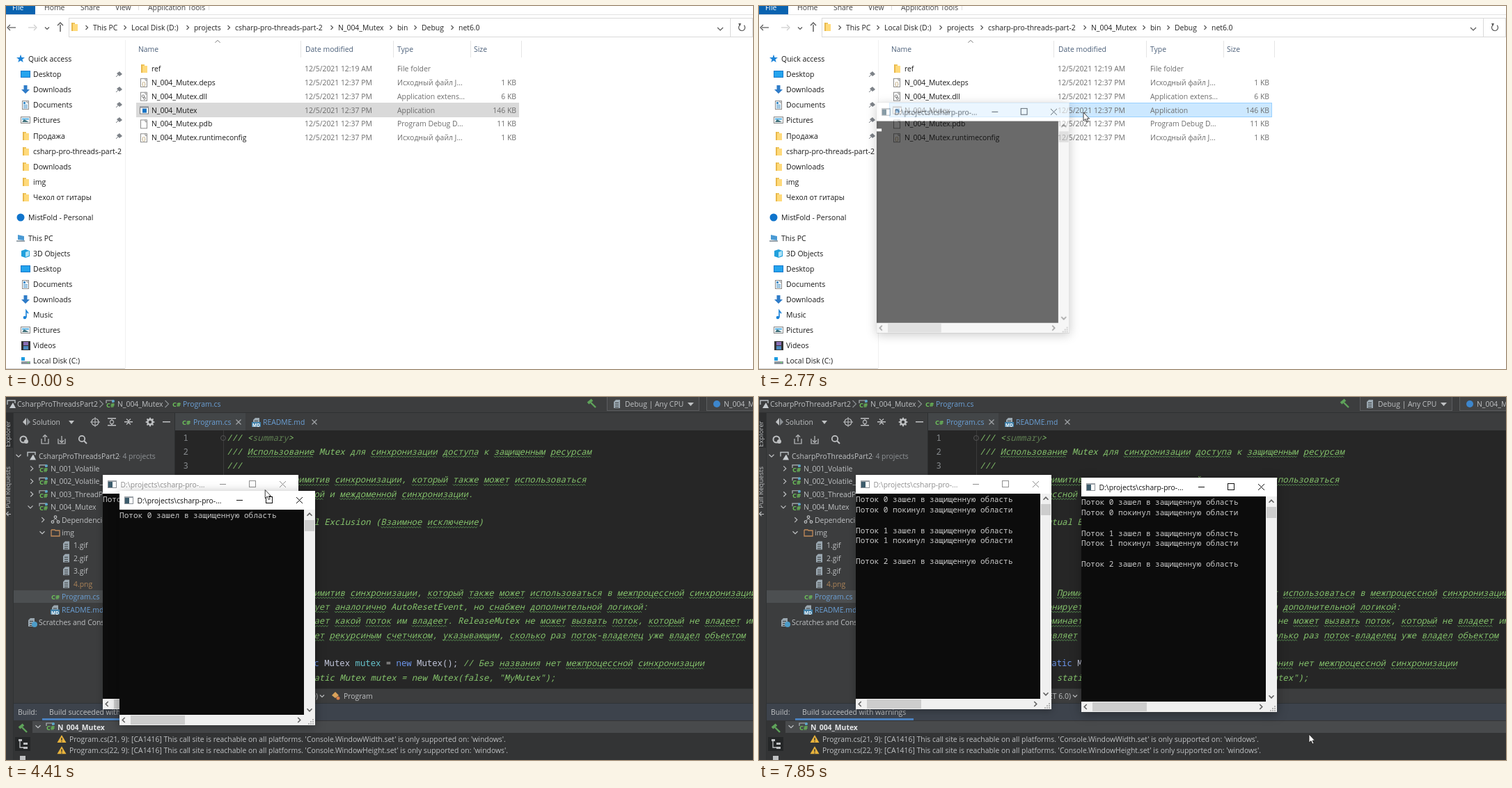
These frames come from a looping animation (1073 by 522 pixels, 8000 ms). An HTML page with a canvas:

```html
<!DOCTYPE html>
<html lang="ru">
<head>
<meta charset="utf-8">
<title>Mutex demo</title>
<style>
html, body { margin: 0; width: 100%; height: 100%; overflow: hidden; background: #fff; }
canvas { display: block; width: 1073px; height: 522px; }
</style>
</head>
<body>
<canvas id="stage" width="1073" height="522"></canvas>
<script>
const W = 1073, H = 522, LOOP = 8000;
const UI = '10.4px "Open Sans", "Noto Sans", sans-serif';
const CODE = 'italic 12.3px "Noto Sans Mono", monospace';
const TERM = '11.05px "Noto Sans Mono", monospace';
const stage = document.getElementById('stage').getContext('2d');
let g = stage;

// Drawing helpers; text is placed by its visual middle.
function rect(x, y, w, h, color) { g.fillStyle = color; g.fillRect(x, y, w, h); }
function text(s, x, y, color = '#1a1a1a', font = UI, align = 'left') {
  g.font = font; g.fillStyle = color; g.textAlign = align;
  g.fillText(s, x, y + 4);
}
function line(color, width, ...p) {
  g.strokeStyle = color; g.lineWidth = width;
  g.beginPath();
  for (let i = 0; i < p.length; i += 2) g.lineTo(p[i], p[i + 1]);
  g.stroke();
}
function box(x, y, w, h, color) { g.strokeStyle = color; g.lineWidth = 1; g.strokeRect(x + .5, y + .5, w - 1, h - 1); }
function dot(x, y, r, color) { g.fillStyle = color; g.beginPath(); g.arc(x, y, r, 0, 7); g.fill(); }
function ring(x, y, r, color, width = 1.2, from = 0, to = 7) {
  g.strokeStyle = color; g.lineWidth = width; g.beginPath(); g.arc(x, y, r, from, to); g.stroke();
}
function poly(color, ...p) {
  g.fillStyle = color; g.beginPath();
  for (let i = 0; i < p.length; i += 2) g.lineTo(p[i], p[i + 1]);
  g.fill();
}
function chevron(x, y, dir, r, color, width = 1.2) {
  g.save(); g.translate(x, y); g.rotate(dir * Math.PI / 2);
  line(color, width, -r / 2, -r, r / 2, 0, -r / 2, r);
  g.restore();
}
const RIGHT = 0, DOWN = 1, LEFT = 2, UP = 3;
function layer(w, h, draw) {
  const c = document.createElement('canvas');
  c.width = w; c.height = h;
  const before = g;
  g = c.getContext('2d');
  draw();
  g = before;
  return c;
}

// ---------- File explorer ----------
const icons = {
  folder(x, y) { rect(x - 4, y - 6, 5, 11, '#f0c75e'); rect(x - 4, y - 4, 9, 10, '#ffda7b'); rect(x - 4, y - 6, 2, 12, '#e8b84c'); },
  page(x, y) { rect(x - 5, y - 6, 10, 13, '#fff'); box(x - 5, y - 6, 10, 13, '#8b8b8b'); line('#8b8b8b', 1, x + 2, y - 6, x + 2, y - 3, x + 5, y - 3); },
  json(x, y) { icons.page(x, y); text('{}', x, y, '#9a7b3a', '7px "Open Sans", sans-serif', 'center'); },
  dll(x, y) { icons.page(x, y); ring(x - 1, y, 1.8, '#777', 1); ring(x + 1, y + 3, 1.5, '#777', 1); },
  app(x, y) { rect(x - 6, y - 5, 13, 11, '#fff'); box(x - 6, y - 5, 13, 11, '#777'); rect(x - 6, y - 5, 13, 2, '#8a9099'); rect(x - 2, y - 2, 6, 6, '#1673c4'); },
  star(x, y) {
    const p = [];
    for (let i = 0; i < 10; i++) { const r = i % 2 ? 2.6 : 6.3, a = i * Math.PI / 5 - 1.57; p.push(x + r * Math.cos(a), y + r * Math.sin(a)); }
    poly('#1b83d8', ...p);
  },
  desktop(x, y) { rect(x - 7, y - 5, 14, 10, '#1278cc'); rect(x - 6, y - 4, 12, 8, '#24a4ee'); },
  down(x, y) { poly('#2f7cc8', x - 2.5, y - 6, x + 2.5, y - 6, x + 2.5, y, x + 6, y, x, y + 6, x - 6, y, x - 2.5, y); },
  doc(x, y) { icons.page(x, y); rect(x - 3, y - 4, 3, 3, '#3a8cc8'); for (let i = 0; i < 3; i++) rect(x - 3, y + i * 2, 6, 1, '#4a94c8'); },
  pic(x, y) { rect(x - 7, y - 5, 14, 10, '#fff'); box(x - 7, y - 5, 14, 10, '#888'); rect(x - 5, y - 3, 10, 3, '#7ec3ea'); poly('#3f6f78', x - 5, y + 3, x - 2, y - 1, x + 5, y + 3); },
  cloud(x, y) { dot(x, y, 5.5, '#0f74cc'); },
  pc(x, y) { poly('#4a9ad4', x - 4, y - 5, x + 5, y - 3, x + 5, y + 3, x - 4, y + 2); rect(x - 6, y + 3, 12, 2, '#9aa4ac'); },
  cube(x, y) { poly('#20a0dc', x, y - 6, x + 6, y - 4, x + 6, y + 4, x, y + 6, x - 6, y + 4, x - 6, y - 4); poly('#aee3f7', x, y - 2, x + 5, y - 4, x + 5, y + 3, x, y + 5); },
  music(x, y) { dot(x - 1, y + 4, 2.3, '#1b83d8'); line('#1b83d8', 1.6, x + 1, y + 4, x + 1, y - 6, x + 4, y - 2); },
  video(x, y) { rect(x - 6, y - 6, 13, 13, '#333'); rect(x - 3, y - 5, 7, 5, '#8a6fb5'); rect(x - 3, y + 1, 7, 5, '#4d8ac0'); },
  disk(x, y) { rect(x - 6, y + 1, 13, 4, '#8c959c'); rect(x - 6, y - 5, 5, 5, '#1b9be0'); rect(x + 3, y + 2, 2, 1, '#5f5'); }
};
const sidebar = [
  ['star', 'Quick access', 76, 0], ['desktop', 'Desktop', 98, 2], ['down', 'Downloads', 120, 2], ['doc', 'Documents', 142, 2],
  ['pic', 'Pictures', 164, 2], ['folder', 'Продажа', 187, 2], ['folder', 'csharp-pro-threads-part-2', 209, 1],
  ['folder', 'Downloads', 231, 1], ['folder', 'img', 253, 1], ['folder', 'Чехол от гитары', 275, 1],
  ['cloud', 'MistFold - Personal', 304, 0], ['pc', 'This PC', 334, 0], ['cube', '3D Objects', 356, 1],
  ['desktop', 'Desktop', 378, 1], ['doc', 'Documents', 400, 1], ['down', 'Downloads', 422, 1], ['music', 'Music', 444, 1],
  ['pic', 'Pictures', 466, 1], ['video', 'Videos', 488, 1], ['disk', 'Local Disk (C:)', 510, 1]
];
const files = [
  ['folder', 'ref', 'File folder', ''], ['json', 'N_004_Mutex.deps', 'Исходный файл J...', '1 KB'],
  ['dll', 'N_004_Mutex.dll', 'Application extens...', '6 KB'], ['app', 'N_004_Mutex', 'Application', '146 KB'],
  ['page', 'N_004_Mutex.pdb', 'Program Debug D...', '11 KB'], ['json', 'N_004_Mutex.runtimeconfig', 'Исходный файл J...', '1 KB']
];

function drawExplorer(hot) {
  g.translate(8, 29);
  rect(-8, -29, 1300, 760, '#fff');
  rect(191, -29, 100, 18, '#ecdcf7');
  text('Manage', 241, -19, '#555', UI, 'center');
  text('net6.0', 316, -19, '#333', UI, 'center');
  icons.folder(0, -19);
  rect(-8, -11, 50, 23, '#0a63b0');
  text('File', 9, 2, '#fff');
  [['Home', 55], ['Share', 107], ['View', 157], ['Application Tools', 204]].forEach(([s, x]) => text(s, x, 2, '#444'));
  rect(190, -11, 1, 17, '#ddd'); rect(291, -11, 1, 17, '#ddd');
  rect(-8, 12, 1300, 1, '#e2e2e2');

  const ink = '#555';
  line(ink, 1.2, 14, 31, 4, 31); chevron(4, 31, LEFT, 4, ink);
  line('#ccc', 1.2, 32, 31, 42, 31); chevron(42, 31, RIGHT, 4, '#ccc');
  chevron(59, 32, DOWN, 3, ink);
  line(ink, 1.4, 78, 37, 78, 27); chevron(78, 26, UP, 4, ink, 1.4);
  box(90, 17, 951, 28, '#d9d9d9'); box(1040, 17, 33, 28, '#d9d9d9'); box(1082, 17, 190, 28, '#d9d9d9');
  text('Search net6.0', 1118, 31, '#777');
  ring(1102, 30, 4, '#777');
  icons.folder(98, 30);
  [['This PC', 125], ['Local Disk (D:)', 180], ['projects', 270], ['csharp-pro-threads-part-2', 329],
   ['N_004_Mutex', 477], ['bin', 562], ['Debug', 597], ['net6.0', 650]].forEach(([s, x]) => {
    chevron(x - 9, 31, RIGHT, 3, ink); text(s, x, 31, '#222');
  });
  chevron(1026, 33, DOWN, 4, ink);
  ring(1057, 31, 4.5, ink, 1.2, -.8, 4.2); poly(ink, 1052, 25, 1056, 25, 1054, 29);

  sidebar.forEach(([icon, name, y, level]) => {
    icons[icon](level ? 28 : 21, y);
    text(name, level ? 39 : 32, y, '#1a1a1a', UI.replace('10.4', '10.5'));
    if (level === 2) { line('#7d8288', 1, 158, y + 4, 161, y + 1); poly('#7d8288', 159, y - 1, 163, y - 4, 167, y, 163, y + 3); }
  });
  rect(171, 49, 1, 472, '#f1f1f1'); rect(0, 521, 171, 1, '#d0d0d0');

  [['Name', 190, 423], ['Date modified', 430, 556], ['Type', 562, 667], ['Size', 672, 740]].forEach(([s, x, edge]) => {
    text(s, x, 62, '#4c607a'); rect(edge, 50, 1, 24, '#e5e5e5');
  });
  chevron(304, 51, UP, 3.5, '#777', 1);
  files.forEach(([icon, name, type, size], i) => {
    const y = 90 + i * 19.85;
    if (i === 3) {
      rect(187, 139, 550, 21, hot ? '#cce8ff' : '#d9d9d9');
      if (hot) box(187, 139, 550, 21, '#99d1ff');
    }
    icons[icon](198, y);
    text(name, 209, y);
    text(i ? '12/5/2021 12:37 PM' : '12/5/2021 12:19 AM', 429, y, '#6d6d6d');
    text(type, 562, y, '#6d6d6d');
    text(size, 733, y, '#6d6d6d', UI, 'right');
  });
}

// ---------- IDE ----------
const CH = 7.38, LEFT_COL = 317, GREEN = '#85c46c';
function codeLine(s, row, color = GREEN, col = 0) {
  const y = 58.5 + (row - 1) * 20.3, x = LEFT_COL + col * CH;
  text(s, x, y, color, CODE);
  for (const m of s.matchAll(/[а-яё]{4,}/gi)) {
    const wave = [];
    for (let i = 0; i <= m[0].length * CH; i += 2) wave.push(x + m.index * CH + i, y + 7 + (i % 4 ? 1 : -1));
    line('#5d9a56', .9, ...wave);
  }
}
function csharp(x, y, color = '#6cbf5a') { text('C#', x, y, color, 'bold 9.5px "Open Sans", sans-serif'); }
function projectIcon(x, y) {
  line('#b0b6ba', 1.2, x + 1, y - 1, x + 1, y - 5, x + 10, y - 5, x + 10, y - 2);
  dot(x + 11, y - 4, 2, '#5aa7c8'); csharp(x + 1, y + 1);
}
function solutionIcon(x, y) {
  line('#b9bfc3', 1.4, x, y + 1, x, y - 5, x + 11, y - 5, x + 11, y - 1);
  poly('#c7ccd0', x + 3, y + 6, x + 8, y - 2, x + 12, y + 6);
}
function fileIcon(x, y, color = '#9aa7b0') {
  poly(color, x + 3, y - 6, x + 9, y - 6, x + 9, y + 6, x, y + 6, x, y - 3);
  for (let i = 0; i < 3; i++) rect(x + 2, y - 2 + i * 3, 5, 1, '#3c3f41');
}
function markdownIcon(x, y) {
  fileIcon(x + 2, y); rect(x, y, 13, 7, '#3f7fa8');
  text('MD', x + 1, y + 3, '#fff', 'bold 6.5px "Open Sans", sans-serif');
}
function hammer(x, y) { line('#5fa35a', 2.4, x + 6, y + 6, x - 1, y - 1); line('#5fa35a', 4, x - 5, y, x + 1, y - 5); }
function warning(x, y) { poly('#e8b33c', x, y - 6, x + 6.5, y + 5, x - 6.5, y + 5); rect(x - .7, y - 2, 1.4, 4, '#333'); rect(x - .7, y + 3, 1.4, 1.2, '#333'); }

function drawIde() {
  const panel = '#3c3d3e', light = '#bfc1c3', blue = '#6ba0d6';
  rect(0, 0, W, H, panel);
  rect(0, 22, W, 1, '#2f3132');
  solutionIcon(2, 10);
  text('CsharpProThreadsPart2', 16, 10, light);
  chevron(137, 10, RIGHT, 5, '#8b8f92'); projectIcon(143, 10);
  text('N_004_Mutex', 160, 10, light);
  chevron(231, 10, RIGHT, 5, '#8b8f92'); csharp(239, 10);
  text('Program.cs', 254, 10, blue);
  hammer(841, 9);
  rect(863, 0, 133, 20, '#434445'); box(863, -1, 133, 21, '#5b5d5f');
  fileIcon(873, 10); text('Debug | Any CPU', 889, 10, light);
  poly(light, 979, 8, 988, 8, 983.5, 13);
  rect(1006, 0, 67, 20, '#434445'); box(1006, -1, 80, 21, '#5b5d5f');
  dot(1021, 10, 5, '#3d86cc'); text('N_004_Mutex', 1031, 10, light);

  rect(0, 23, 10, H, '#393a3b'); rect(0, 23, 10, 50, '#2d2e2f'); rect(10, 23, 1, H, '#303233');
  [['Explorer', 72], ['Pull Requests', 160]].forEach(([s, y]) => {
    g.save(); g.translate(2, y); g.rotate(-Math.PI / 2); text(s, 0, 0, light, UI.replace('10.4', '9.6')); g.restore();
  });
  rect(2, 168, 5, 1, light); chevron(2, 168, LEFT, 3, light);

  poly(light, 24, 36, 29, 30, 29, 41); poly('#8b9094', 30, 30, 35, 36, 30, 41);
  text('Solution', 38, 36, light); poly(light, 90, 34, 98, 34, 94, 39);
  ring(128, 36, 5, light); line(light, 1, 121, 36, 135, 36); line(light, 1, 128, 29, 128, 43);
  // Expand all, then collapse all.
  [152, 176].forEach((x, i) => {
    if (i) rect(x - 6, 35, 12, 1.5, light);
    else { rect(x - 6, 30, 12, 1.5, light); rect(x - 6, 40, 12, 1.5, light); }
    chevron(x, i ? 33 : 34, i ? DOWN : UP, 3, light); chevron(x, 38, i ? UP : DOWN, 3, light);
  });
  ring(207, 36, 3.6, light, 2.6);
  for (let i = 0; i < 8; i++) dot(207 + 5.4 * Math.cos(i * .785), 36 + 5.4 * Math.sin(i * .785), 1.1, light);
  rect(225, 35, 11, 1.5, light);
  ring(25, 61, 4.5, light, 2); dot(29, 64, 3, light);
  [56, 80].forEach((x, i) => {
    line(light, 1.2, x - 5, 60, x - 5, 67, x + 5, 67, x + 5, 60);
    line(light, 1.2, x, 64, x, 56); chevron(x, i ? 64 : 56, i ? DOWN : UP, 3, light);
  });
  ring(109, 60, 4.2, light, 1.8); line(light, 2, 112, 63, 116, 67);

  rect(11, 278, 232, 18, '#4c4f51');
  const rowY = i => 84.5 + i * 18.42;
  chevron(18, rowY(0), DOWN, 3.5, light); solutionIcon(31, rowY(0));
  text('CsharpProThreadsPart2', 47, rowY(0), light); text('· 4 projects', 162, rowY(0), '#8d9194');
  ['N_001_Volatile', 'N_002_Volatile_Fix', 'N_003_ThreadPool', 'N_004_Mutex'].forEach((s, i) => {
    chevron(i < 3 ? 37 : 35, rowY(i + 1), i < 3 ? RIGHT : DOWN, 3.5, light);
    projectIcon(47, rowY(i + 1)); text(s, 64, rowY(i + 1), light);
  });
  chevron(53, rowY(5), RIGHT, 3.5, light);
  [[71, -4], [67, 3], [75, 3]].forEach(([x, dy]) => ring(x, rowY(5) + dy, 1.8, light));
  line(light, 1, 68, rowY(5) + 1, 71, rowY(5) - 2, 74, rowY(5) + 1); text('Dependencies', 80, rowY(5), light);
  chevron(52, rowY(6), DOWN, 3.5, light);
  line('#c08a5a', 1.3, 65, rowY(6) - 4, 70, rowY(6) - 4, 71, rowY(6) - 3, 77, rowY(6) - 3, 77, rowY(6) + 5, 65, rowY(6) + 5, 65, rowY(6) - 4);
  text('img', 80, rowY(6), light);
  ['1.gif', '2.gif', '3.gif', '4.png'].forEach((s, i) => { fileIcon(82, rowY(i + 7)); text(s, 97, rowY(i + 7), i < 3 ? light : '#ad8458'); });
  csharp(65, rowY(11)); text('Program.cs', 80, rowY(11), blue);
  markdownIcon(64, rowY(12)); text('README.md', 80, rowY(12), blue);
  fileIcon(32, rowY(13)); dot(41, rowY(13) + 3, 4, '#4d9cc8'); text('Scratches and Consoles', 47, rowY(13), light);

  rect(242, 23, 1, 418, '#2d2f30');
  rect(243, 23, 101, 25, '#434648');
  csharp(253, 36); text('Program.cs', 269, 36, blue);
  markdownIcon(353, 36); text('README.md', 369, 36, blue);
  [334, 443].forEach(x => { line('#a0a4a7', 1.2, x - 3.5, 32.5, x + 3.5, 39.5); line('#a0a4a7', 1.2, x + 3.5, 32.5, x - 3.5, 39.5); });
  rect(243, 48, W, 372, '#262626'); rect(312, 48, 1, 372, '#3a3a3a');
  for (let n = 1; n <= 18; n++) text(String(n), n < 10 ? 262 : 269, 58.5 + (n - 1) * 20.3, '#85898c', CODE.replace('italic ', ''), 'right');
  ring(312, 59, 3.5, '#555', 1);
  codeLine('/// <', 1); codeLine('summary', 1, '#5f7f52', 5); codeLine('>', 1, GREEN, 12);
  codeLine('/// Использование Mutex для синхронизации доступа к защищенным ресурсам', 2);
  codeLine('///', 3);
  codeLine('/// Mutex - Примитив синхронизации, который также может использоваться', 4);
  codeLine('/// в межпроцессной и междоменной синхронизации.', 5);
  codeLine('/// Mutex - Mutual Exclusion (Взаимное исключение)', 7);
  codeLine('Примитив синхронизации, который также может использоваться в межпроцессной синхронизации', 12, GREEN, 15);
  codeLine('функционирует аналогично AutoResetEvent, но снабжен дополнительной логикой:', 13, GREEN, 7);
  codeLine('запоминает какой поток им владеет. ReleaseMutex не может вызвать поток, который не владеет им', 14, GREEN, 10);
  codeLine('управляет рекурсиным счетчиком, указывающим, сколько раз поток-владелец уже владел объектом', 15, GREEN, 10);
  [['static', 12, '#6c95eb'], ['Mutex', 19, '#c0c4d8'], ['mutex', 25, '#66c3cc'], ['=', 31, '#bdbdbd'], ['new', 33, '#6c95eb'], ['Mutex();', 37, '#c0c4d8']]
    .forEach(([s, col, color]) => text(s, LEFT_COL + col * CH, 383.3, color, CODE.replace('italic ', '')));
  codeLine('// Без названия нет межпроцессной синхронизации', 17, GREEN, 46);
  codeLine('static Mutex mutex = new Mutex(false, "MyMutex");', 18, GREEN, 15);

  rect(243, 419, W, 22, panel); rect(243, 419, W, 1, '#303233');
  text('(.NET 6.0)', 448, 430, light, UI, 'right'); chevron(454, 430, DOWN, 3, light);
  poly('#d9a25a', 468, 429, 473, 424, 478, 429, 473, 433); dot(477, 433, 2.5, '#d77f4a');
  text('Program', 485, 430, light);

  rect(11, 440, W, 25, '#3d434c'); rect(11, 440, W, 1, '#303438');
  text('Build:', 17, 453, light); text('Build succeeded with warnings', 62, 453, light);
  rect(52, 462, 170, 3, '#4a80bd');
  rect(11, 465, W, 57, '#333435'); rect(38, 466, W, 17, '#484a4c');
  hammer(24, 476);
  rect(13, 489, 22, 20, '#242627');
  line(light, 1.3, 20, 493, 20, 504, 28, 504); rect(18, 492, 5, 3, light); rect(25, 497, 6, 3, light); rect(25, 503, 6, 3, light);
  rect(20, 516, 8, 6, light);
  chevron(46, 474, DOWN, 3.5, light); projectIcon(57, 474);
  text('N_004_Mutex', 74, 474.5, '#e4e6e8', 'bold ' + UI);
  ['(21, 9)|Width', '(22, 9)|Height'].forEach((s, i) => {
    const [at, prop] = s.split('|'), y = 492 + i * 16.3;
    warning(80, y);
    text(`Program.cs${at}: [CA1416] This call site is reachable on all platforms. 'Console.Window${prop}.set' is only supported on: 'windows'.`, 91, y, light);
  });
}

// ---------- Console windows ----------
const CW = 281, CHT = 337;
function drawConsole(active, lines, caret) {
  const ink = active ? '#111' : '#8f8f8f';
  rect(0, 0, CW, CHT, '#f0f0f0'); rect(0, 0, CW, 27, '#fff');
  rect(7, 8, 13, 11, '#fff'); box(7, 8, 13, 11, '#8a9096'); rect(8, 9, 6, 9, '#3c5c6c'); rect(7, 8, 13, 2, '#9aa0a6');
  text('D:\\projects\\csharp-pro-...', 25.5, 13.5, ink);
  rect(168, 13, 9, 1, ink); box(210, 8, 10, 10, ink);
  line(ink, 1, 254, 9, 263, 18); line(ink, 1, 263, 9, 254, 18);
  rect(0, 27, 265, 295, '#0c0c0c');
  lines.forEach((s, i) => text(s, 0, 35.3 + i * 14.75, '#ccc', TERM));
  if (caret) rect(0, 38 + lines.length * 14.75, 7, 4, '#fff');
  const gray = '#606060';
  chevron(273, 34, UP, 3.5, gray, 1.6); chevron(273, 315, DOWN, 3.5, gray, 1.6);
  chevron(6, 329.5, LEFT, 3.5, gray, 1.6); chevron(258, 329.5, RIGHT, 3.5, gray, 1.6);
  rect(266, 42, 14, 16, '#cdcdcd'); rect(16, 323, 78, 13, '#cdcdcd');
  for (let i = 0; i < 3; i++) for (let j = 0; j <= i; j++) rect(271 + i * 3, 334 - j * 3, 2, 2, '#b5b5b5');
}
function threadLog(times, t) {
  const out = [];
  times.forEach((at, k) => {
    if (t < at) return;
    if (k) out.push(`Поток ${k - 1} покинул защищенную области`, '');
    out.push(`Поток ${k} зашел в защищенную область`);
  });
  return out;
}
// The shadow is kept outside the frame so a fading window stays clear.
function dropShadow(active) {
  g.save();
  g.beginPath();
  g.rect(-40, -40, CW + 80, CHT + 80); g.rect(0, 0, CW, CHT);
  g.clip('evenodd');
  g.shadowColor = `rgba(0,0,0,${active ? .35 : .25})`; g.shadowBlur = active ? 14 : 9; g.shadowOffsetY = 3;
  rect(0, 0, CW, CHT, '#000');
  g.restore();
}
function showConsole(x, y, age, active, lines, caret) {
  const p = Math.min(1, age / 112), rest = 1 - p, s = 1 - .11 * rest ** 2;
  if (p <= 0) return;
  const img = layer(CW, CHT, () => drawConsole(active, lines, caret));
  g.save();
  g.globalAlpha = p;
  g.translate(x + CW / 2 + 10 * rest, y + CHT / 2 + 3 * rest); g.scale(s, s);
  g.translate(-CW / 2, -CHT / 2);
  dropShadow(active);
  g.drawImage(img, 0, 0);
  g.restore();
}

// ---------- Timeline ----------
// Bursts of motion: start, end, number of held steps.
const bursts = [[0, 0, 1], [190, 800, 10], [1220, 1360, 3], [1500, 2220, 12], [2360, 2570, 4], [2710, 3190, 8], [3660, 3660, 1],
  [3800, 4550, 12], [4620, 4620, 1], [4810, 5580, 12], [5780, 6050, 5], [6310, 6660, 6], [7060, 7060, 1], [7590, 7590, 1], [7850, 7850, 1]];
function heldTime(t) {
  const [a, b, n] = bursts.filter(s => s[0] <= t).pop();
  if (n === 1) return a;
  const step = (b - a) / (n - 1);
  return a + step * Math.min(n - 1, Math.floor((t - a) / step + .13));
}
function along(keys, t) {
  const i = keys.findIndex(k => k[0] > t);
  if (i < 0) return keys[keys.length - 1].slice(1);
  if (!i) return keys[0].slice(1);
  const a = keys[i - 1], b = keys[i];
  let p = (t - a[0]) / (b[0] - a[0]);
  p = p * p * (3 - 2 * p);
  return [a[1] + (b[1] - a[1]) * p, a[2] + (b[2] - a[2]) * p];
}
const mouseKeys = [[190, 400, 374], [800, 293, 146], [1640, 293, 146], [2220, 466, 153], [2800, 466, 153], [3190, 1016, -20],
  [3860, 1010, -20], [4550, 300, 151], [4810, 300, 151]];
const afterDrag = [[5580, 600, 132], [5780, 600, 135], [6050, 630, 318], [6310, 643, 333], [6660, 790, 485]];
const dragKeys = [[4810, 163, 135], [4880, 200, 143], [5090, 482, 125], [5220, 498, 124], [5580, 463, 116]];
const presses = [[1220, 1290], [1360, 1500], [2360, 2430], [2500, 2570], [4810, 5580]];
const within = (t, a, b) => t >= a && t < b;

function drawMouse(x, y, pressed) {
  if (pressed) dot(x, y, 11, 'rgba(247,222,30,.85)');
  const p = [0, 0, 0, 12, 3, 9.5, 5, 14, 7, 13, 5, 9, 8.5, 9].map((v, i) => v + (i % 2 ? y : x));
  poly('#fff', ...p);
  line('#222', .9, ...p, x, y);
}

const explorer = [false, true].map(hot => layer(1308, 789, () => drawExplorer(hot)));
const ide = layer(W, H, drawIde);

function render(now) {
  const t = heldTime(now % LOOP);
  const win = along(dragKeys, t);
  const mouse = within(t, 4810, 5580) ? [win[0] + 137, win[1] + 16] : along(t < 4810 ? mouseKeys : afterDrag, t);
  const log1 = threadLog([1630, 4620, 6590], t), log2 = threadLog([2840, 5780, 7850], t);
  const first = () => showConsole(139, 112, t - 1500, t < 2360, log1, t < 1630);
  const second = () => showConsole(win[0], win[1], t - 2710, true, log2,
    t < 2840 || within(t, 6000, 6530) || within(t, 7060, 7590));

  g.clearRect(0, 0, W, H);
  if (t < 3800) {
    const covered = within(t, 1500, 2360) && mouse[0] < 139 + CW;
    const hover = t >= 190 && within(mouse[1], 139, 160) && within(mouse[0], 187, 737) && !covered;
    g.drawImage(explorer[+hover], -8, -29);
    if (within(t, 1500, 2360)) first();
    if (within(t, 2710, 3660)) second();
  } else {
    g.drawImage(ide, 0, 0);
    first();
    second();
    const p = (t - 3800) / 136;
    if (p < 1) {
      const s = .8 - .25 * p;
      g.globalAlpha = .52 * (1 - p);
      g.drawImage(explorer[0], 138 + 130 * p, 154 + 220 * p, 1308 * s, 789 * s);
      g.globalAlpha = 1;
    }
  }
  if (t >= 190) drawMouse(mouse[0], mouse[1], presses.some(([a, b]) => within(t, a, b)));
}

const start = performance.now();
function tick() {
  render(performance.now() - start);
  requestAnimationFrame(tick);
}
tick();
</script>
</body>
</html>
```
